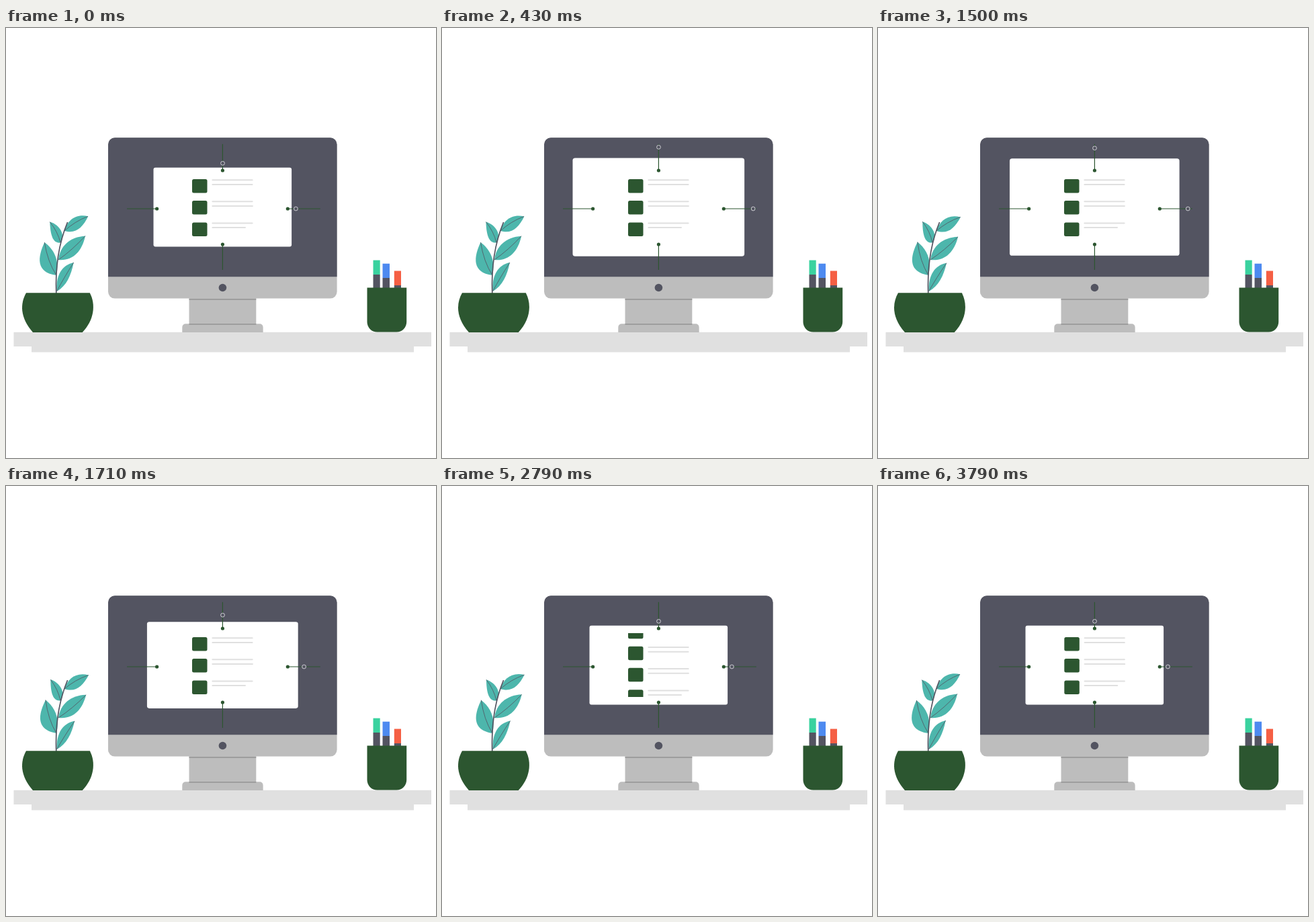
Write an HTML page that moves like this. It is 640 px wide and 640 px high and loops after 3.87 s.

```html
<!DOCTYPE html>
<html lang="en">
<head>
<meta charset="utf-8">
<title>Desk</title>
<style>
  html, body { margin: 0; width: 100%; height: 100%; overflow: hidden; background: #fff; }
  svg { display: block; width: 100vw; height: 100vh; }
  .dark { fill: #535461; }
  .green { fill: #2c5630; }
  .metal { fill: #bdbdbd; }
  .table { fill: #e0e0e0; }
  .guide { stroke: #2c5630; stroke-width: 1.2; }
  .knob { fill: #535461; stroke: #dcdce0; stroke-width: .9; }
  .leaf { fill: #4db6ac; }
  .vein { fill: none; stroke: #535461; stroke-width: .8; }
</style>
</head>
<body>
<svg viewBox="0 0 640 640">
  <defs>
    <clipPath id="window"><path d="M270 219H375V314H270z"/></clipPath>
    <g id="row">
      <rect class="green" x="277" y="225" width="22.5" height="20.5" rx="2.5"/>
      <rect class="table" x="306.3" y="225.2" width="61.3" height="2" rx="1"/>
    </g>
    <g id="page">
      <use href="#row"/>
      <use href="#row" y="32"/>
      <use href="#row" y="64.4"/>
      <path d="M307.3 233H366.6M307.3 264.9H366.9M307.3 297.1H356" stroke="#e0e0e0" stroke-width="2" stroke-linecap="round"/>
    </g>
  </defs>

  <path class="table" d="M11.5 452.8H633V474H607V482.5H38V474H11.5z"/>

  <!-- monitor -->
  <path class="metal" d="M262.3 453V445.2a5 5 0 0 1 5-5H377.6a5 5 0 0 1 5 5V453z"/>
  <rect class="metal" x="272.5" y="402" width="99.8" height="39"/>
  <path d="M272.5 403.8H372.3M272.5 440.9H372.3" stroke="#999" stroke-width="1.8"/>
  <rect class="metal" x="152" y="163.2" width="340.6" height="239.4" rx="10"/>
  <path class="dark" d="M152 370.2V173.2a10 10 0 0 1 10-10H482.6a10 10 0 0 1 10 10V370.2z"/>
  <circle class="dark" cx="322.4" cy="386.5" r="5.8"/>

  <!-- screen -->
  <rect id="panel" x="-102.8" y="-58.8" width="205.6" height="117.6" rx="3" fill="#fff"/>
  <g clip-path="url(#window)">
    <g id="list">
      <use href="#page"/>
      <use href="#page" y="96.6"/>
      <use href="#page" x=".3" y="193.2"/>
    </g>
  </g>
  <path class="guide" d="M322.4 172.8V212M322.4 322V360M180 269H224.5M419.3 269H467.8"/>
  <g class="green">
    <circle cx="322.4" cy="212" r="2.6"/>
    <circle cx="322.4" cy="322" r="2.6"/>
    <circle cx="224.6" cy="269" r="2.6"/>
    <circle cx="419.3" cy="269" r="2.6"/>
  </g>
  <circle id="knobTop" class="knob" cx="322.5" r="2.9"/>
  <circle id="knobRight" class="knob" cy="269" r="2.9"/>

  <!-- plant -->
  <g id="leaves"></g>
  <path d="M74.8 396C73 352 79.5 318 91.6 289" fill="none" stroke="#535461" stroke-width="1.7"/>
  <path class="green" d="M30 394.3H124.8C134 412 131 435 113.7 453H40C20.5 431 21 410 30 394.3z"/>

  <!-- pens -->
  <path class="dark" d="M546.5 367H556.7V388H546.5zM560.5 372H571V388H560.5zM577.8 383H588V388H577.8z"/>
  <path fill="#3ad29f" d="M546.5 345.6H556.7V367H546.5z"/>
  <path fill="#4d8af0" d="M560.5 350.7H571V372H560.5z"/>
  <path fill="#f55f44" d="M577.8 361.5H588V383H577.8z"/>
  <path class="green" d="M537.5 386.6H596.2V437.6a15 15 0 0 1-15 15H552.5a15 15 0 0 1-15-15z"/>
</svg>
<script>
const LOOP = 3870, SWAY = 2, PAGE = 96.6;
const byId = id => document.getElementById(id);
const clamp = x => Math.min(1, Math.max(0, x));
const ramp = (t, from, to) => clamp((t - from) / (to - from));
const ease = p => (1 - Math.cos(Math.PI * p)) / 2;

// Each leaf: pivot, outline, vein
const leaves = [
  ['87 302', 'M87 302C91 287 103 276 122.3 280.3C114 297 104 307 87 302z', 'M87 302Q102 288 122 280.3'],
  ['78 345', 'M78 345C80 325 95 311 118 309.5C113 333 99 347 78 345z', 'M78 345Q98 331 118 309.5'],
  ['75.5 392', 'M75.5 392C74 368 83 353 100.7 349C97 368 90 384 75.5 392z', 'M75.5 392Q86 372 100.7 349'],
  ['81 319.5', 'M65.3 288.6C80 293 89 308 81 319.5C70 321 66 309 65.3 288.6z', 'M81 319.5Q77 303 65.3 288.6'],
  ['75 368', 'M57.3 319C47 341 44 364 75 368C80 345 71 329 57.3 319z', 'M75 368Q62 348 57.3 319']
];
byId('leaves').innerHTML = leaves.map(([, outline, vein]) =>
  `<g><path class="leaf" d="${outline}"/><path class="vein" d="${vein}"/></g>`).join('');
const leafNodes = [...byId('leaves').children];

function draw(now) {
  const t = now % LOOP;
  const grow = ease(ramp(t, 0, 480)) - ease(ramp(t, 1400, 1933));
  byId('panel').setAttribute('transform', `translate(322.3 266.6) scale(${1 + grow / 4})`);
  byId('knobTop').setAttribute('cy', 201.3 - 24.6 * grow);
  byId('knobRight').setAttribute('cx', 431.4 + 32.6 * grow);

  const scroll = 2 * PAGE * ramp(t, 2333, 3400);
  byId('list').setAttribute('transform', `translate(0 ${-scroll})`);

  const angle = SWAY * ease(2 * t / LOOP);
  leafNodes.forEach((node, i) => node.setAttribute('transform', `rotate(${angle} ${leaves[i][0]})`));
}

let start;
function tick(now) {
  start ??= now;
  draw(now - start);
  requestAnimationFrame(tick);
}
draw(0);
requestAnimationFrame(tick);
</script>
</body>
</html>
```
